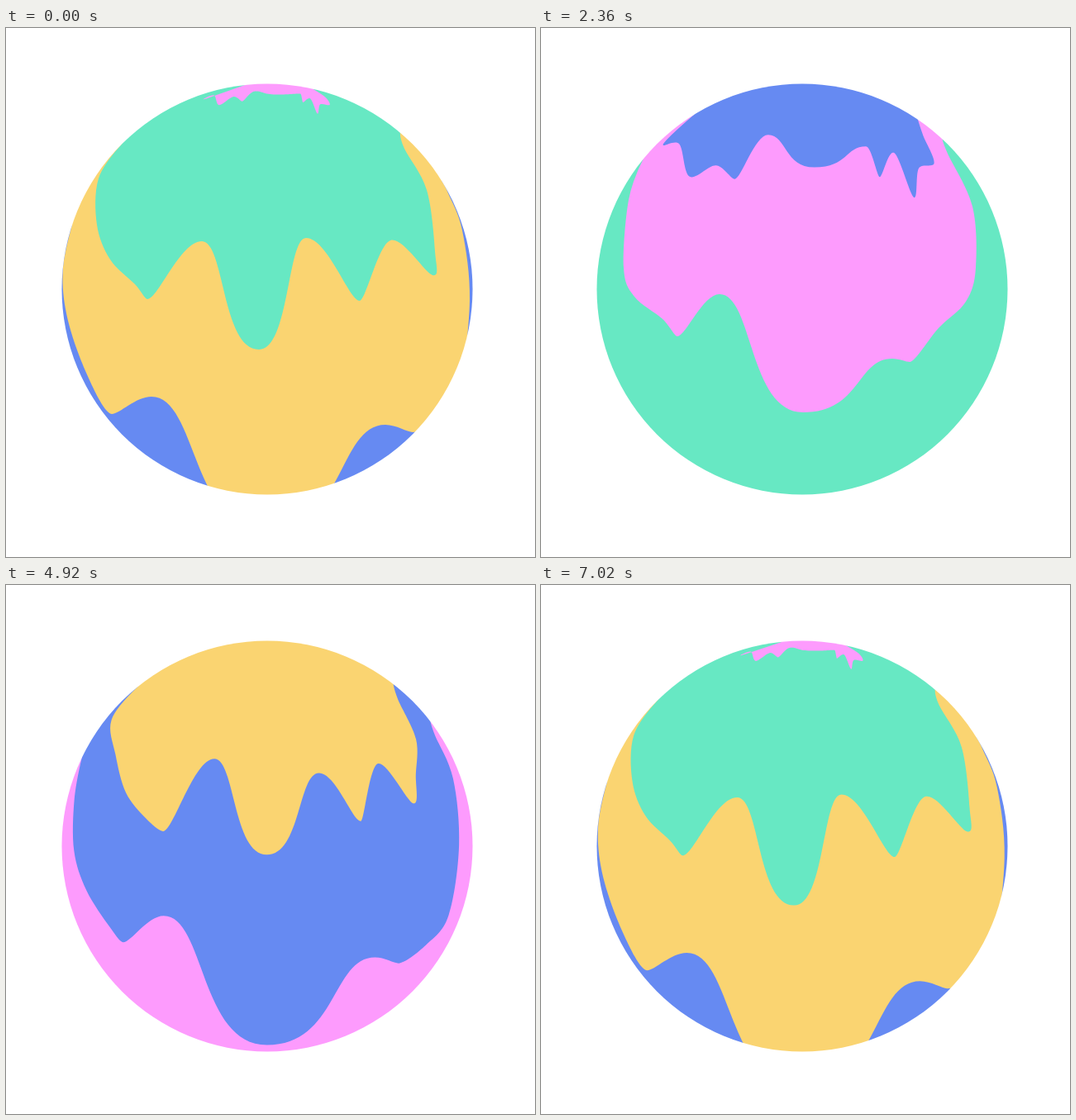
Recreate the animation shown at these times as an HTML page with a canvas. Size 640 by 640 pixels, loop 7160 ms.

```html
<!DOCTYPE html>
<html>
<head>
<meta charset="utf-8">
<style>
html, body { margin: 0; width: 100%; height: 100%; overflow: hidden; background: #fff; }
canvas { display: block; }
</style>
</head>
<body>
<canvas id="stage" width="640" height="640"></canvas>
<script>
const ctx = document.getElementById('stage').getContext('2d');
const LOOP = 7160, LEAD = 320, COVERED = 4300;
const CENTER = 316, RADIUS = 248.5;
const COATS = [
  { color: '#fd9bfd', sag: 0 },
  { color: '#668af2', sag: 35 },
  { color: '#fad471', sag: 0 },
  { color: '#67e8c3', sag: 0 }
];

// Key points of the running edge, left to right: four on the left wall,
// drip, crest, main drip, crest, drip, crest, drip, three on the right wall
const pose = (age, text) => ({ age, points: text.split(' ').map(p => p.split(',').map(Number)) });
const POSES = [
  pose(350, '153,135 177,121 190,157 226,126 248,143 281,106 335,118 396,115 402,147 421,133 439,188 446,154 470,156 459,128'),
  pose(1130, '135,154 143,190 154,238 175,269 199,284 259,188 320,297 386,215 430,265 443,197 482,248 485,210 490,182 471,136'),
  pose(1790, '112,182 110,238 126,280 156,310 171,328 237,258 306,389 363,254 428,330 465,257 516,299 519,270 509,196 482,146'),
  pose(2360, '106,208 100,290 113,325 147,352 165,373 216,322 317,465 425,400 446,404 481,363 514,331 526,290 522,216 492,152'),
  pose(3580, '69,290 72,340 88,395 113,450 128,467 176,446 315,610 459,480 492,489 524,478 548,440 561,330 552,245 535,200')
];
// Roundness of the level turning points; the others follow their neighbours
const ROUND = { 4: 0.2, 5: 0.4, 6: 0.65, 7: 0.4, 8: 0.2 };
const SAGGING = [3, 4, 6, 8];

function edgeAt(age, sag) {
  const first = POSES[0];
  if (age < first.age) {
    // The first fringe spreads from the top of the ball
    const s = (age + LEAD) / (first.age + LEAD);
    return first.points.map(([x, y]) => [320 + (x - 320) * s, 62 + (y - 62) * s ** 1.5]);
  }
  let i = 1;
  while (i < POSES.length - 1 && POSES[i].age <= age) i++;
  const from = POSES[i - 1], to = POSES[i];
  let k = (age - from.age) / (to.age - from.age);
  if (k > 1) k = 1 + (k - 1) * 1.3; // gathers speed as it slips underneath
  const droop = sag * Math.max(0, 1 - Math.abs(age - 2250) / 600);
  return from.points.map(([x, y], j) => [
    x + (to.points[j][0] - x) * k,
    y + (to.points[j][1] - y) * k + (SAGGING.includes(j) ? droop : 0)
  ]);
}

function rim([x, y], turn) {
  const a = Math.atan2(y - CENTER, x - CENTER) + turn * Math.PI / 180;
  return [CENTER + RADIUS * Math.cos(a), CENTER + RADIUS * Math.sin(a)];
}

function tracePaint(edge) {
  const last = edge.length - 1;
  const start = rim(edge[0], 12), end = rim(edge[last], -4);
  const handle = (i, other) => {
    const p = edge[i];
    if (ROUND[i]) return [p[0] + (other[0] - p[0]) * ROUND[i], p[1]];
    const prev = edge[i - 1] || start, next = edge[i + 1] || end;
    const side = other === next ? 1 / 6 : -1 / 6;
    return p.map((v, axis) => v + (next[axis] - prev[axis]) * side);
  };
  ctx.beginPath();
  ctx.moveTo(0, 0);
  ctx.lineTo(...start);
  ctx.quadraticCurveTo(...handle(0, start), ...edge[0]);
  for (let i = 1; i <= last; i++) {
    ctx.bezierCurveTo(...handle(i - 1, edge[i]), ...handle(i, edge[i - 1]), ...edge[i]);
  }
  ctx.quadraticCurveTo(...handle(last, end), ...end);
  ctx.lineTo(640, 0);
  ctx.closePath();
}

function draw(t) {
  ctx.globalCompositeOperation = 'source-over';
  ctx.clearRect(0, 0, 640, 640);
  const coats = COATS.map((coat, i) => ({
    ...coat,
    age: (t - i * LOOP / 4 + LEAD + LOOP) % LOOP - LEAD
  })).sort((a, b) => b.age - a.age);
  for (const { color, sag, age } of coats) {
    ctx.fillStyle = color;
    if (age < COVERED) {
      tracePaint(edgeAt(age, sag));
      ctx.fill();
    } else {
      ctx.fillRect(0, 0, 640, 640);
    }
  }
  ctx.globalCompositeOperation = 'destination-in';
  ctx.beginPath();
  ctx.arc(CENTER, CENTER, RADIUS, 0, Math.PI * 2);
  ctx.fill();
}

// The picture advances in uneven beats and rests just before the loop closes
function poseTime(t) {
  if (t >= 7020) return LOOP - 10;
  const inBar = t % 560;
  return t - inBar + [440, 300, 260, 120, 0].find(beat => beat <= inBar);
}

const began = performance.now();
function tick() {
  draw(poseTime((performance.now() - began) % LOOP));
  requestAnimationFrame(tick);
}
tick();
</script>
</body>
</html>
```
